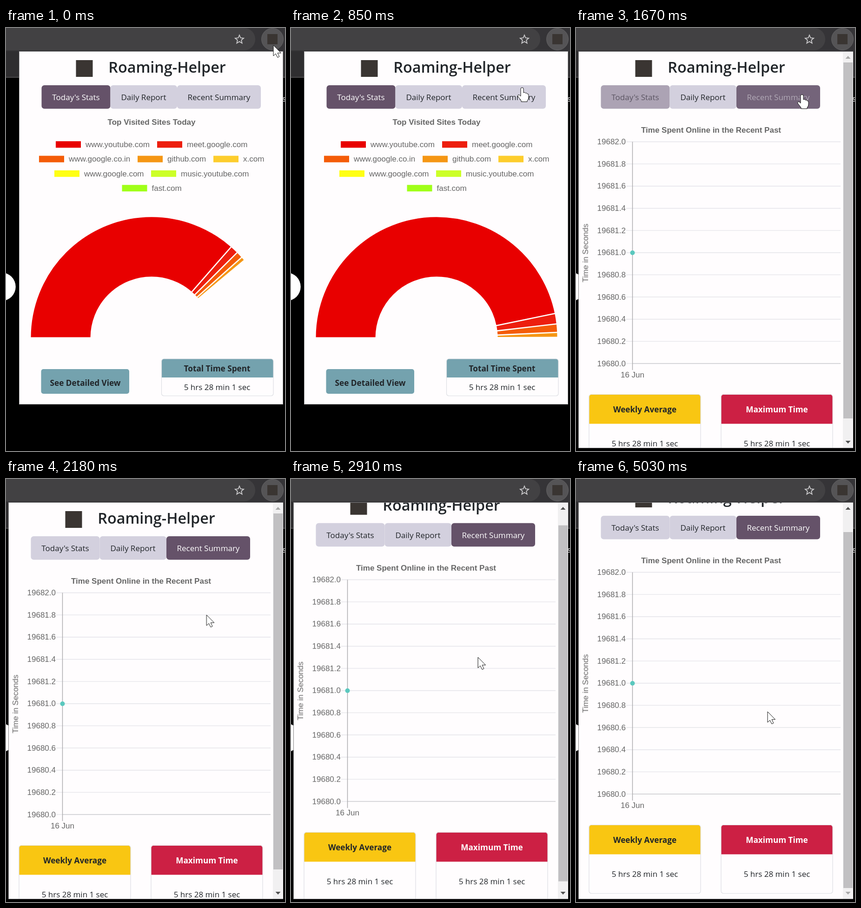
An HTML page for the animation above (5.91 s loop, 600 by 909 pixels).

```html
<!DOCTYPE html>
<html lang="en">
<head>
<meta charset="utf-8">
<title>Browsing statistics popup</title>
<style>
@property --p { syntax: "<number>"; inherits: true; initial-value: 1; }
html, body { margin: 0; width: 100%; height: 100%; overflow: hidden; background: #000; }
svg { display: block; width: 600px; height: 909px; }
text { font: 17px "Open Sans", "Noto Sans", sans-serif; fill: #212529; text-anchor: middle; }
.chart text { font-family: "Liberation Sans", Arial, sans-serif; fill: #666; }
.left text { text-anchor: start; }
.ticks text { text-anchor: end; }
.ticks path { stroke: #e4e4e9; stroke-width: 1.4; }
text.bold { font-weight: 700; font-size: 17.2px; }
.chart text.bold { font-size: 17px; }
text.title { font-size: 32.3px; font-weight: 600; }
.arc { fill: none; stroke-width: 128; stroke-dasharray: calc(var(--len) * var(--p) * 1px) 720px; }
.seg { transform: rotate(calc(var(--from) * var(--p) * 1deg)); }
.seg line { stroke: #fff; stroke-width: 2.6; }
.tab text { fill: currentColor; }
.tab { fill: #d3d0de; color: #212529; }
.box { fill: none; stroke: #dcdee3; stroke-width: 1.2; }

/* one shared 5910 ms loop */
.loop, .tab.was, .tab.now { animation: 5910ms linear infinite both; }
.donut { animation-name: sweep; }
.before { animation-name: before; }
.after { animation-name: after; }
.shift { animation-name: shift; }
.today { animation-name: fadeOut; }
.recent { animation-name: fadeIn; }
.scroll { animation-name: scroll; }
.thumb { animation-name: thumb; }
.up { animation-name: up; }
.down { animation-name: down; }
.cursor { animation-name: move; }
.arrow { animation-name: arrow; }
.hand { animation-name: hand; }
.tab.was { animation-name: deselect; }
.tab.now { animation-name: select; }

@keyframes sweep {
  0% { --p: .778; animation-timing-function: cubic-bezier(.25, 1, .5, 1); }
  11.61%, 100% { --p: 1; }
}
@keyframes before { 0%, 24.53% { opacity: 1; } 24.54%, 100% { opacity: 0; } }
@keyframes after { 0%, 24.53% { opacity: 0; } 24.54%, 100% { opacity: 1; } }
@keyframes shift {
  0%, 24.53% { transform: translateX(0); }
  24.54%, 100% { transform: translateX(-23px); }
}
@keyframes fadeOut { 0%, 21.83% { opacity: 1; } 24.1%, 100% { opacity: 0; } }
@keyframes fadeIn { 0%, 24.53% { opacity: 0; } 27.07%, 100% { opacity: 1; } }
@keyframes deselect {
  0%, 23.01% { fill: #655269; color: #fff; }
  23.52% { fill: #746477; color: #e4dfe6; }
  28.26% { fill: #aca3b4; color: #5c5663; }
  30.29%, 100% { fill: #d3d0de; color: #212529; }
}
@keyframes select {
  0%, 22.34% { fill: #d3d0de; color: #212529; }
  23.52% { fill: #a092a4; color: #3d3843; }
  28.26% { fill: #74647a; color: #b0a8b5; }
  30.29%, 100% { fill: #655269; color: #fff; }
}
@keyframes scroll {
  0%, 46.28% { transform: translateY(0); }
  50.93%, 100% { transform: translateY(-44px); }
}
@keyframes thumb {
  0%, 46.28% { transform: translateY(0); }
  50.93%, 100% { transform: translateY(40px); }
}
@keyframes up { 0%, 46.28% { fill: #a8a8a8; } 46.29%, 100% { fill: #505050; } }
@keyframes down { 0%, 50.92% { fill: #505050; } 50.93%, 100% { fill: #a8a8a8; } }
@keyframes move {
  0%, 2.54% { transform: translate(575px, 37px); animation-timing-function: ease-in-out; }
  13.87% { transform: translate(497px, 128px); }
  14.4% { transform: translate(497px, 128px); animation-timing-function: ease-out; }
  20.98%, 31.3% { transform: translate(486px, 143px); animation-timing-function: ease-in-out; }
  40.95%, 46.7% { transform: translate(400px, 377px); }
  51.78% { transform: translate(404px, 389px); animation-timing-function: ease-in-out; }
  59.56%, 100% { transform: translate(412px, 500px); }
}
@keyframes arrow { 0%, 11.84% { opacity: 1; } 11.85%, 32.49% { opacity: 0; } 32.5%, 100% { opacity: 1; } }
@keyframes hand { 0%, 11.84% { opacity: 0; } 11.85%, 32.49% { opacity: 1; } 32.5%, 100% { opacity: 0; } }
</style>
</head>
<body>
<svg viewBox="0 0 600 909">
  <clipPath id="view"><rect x="0" y="51" width="596" height="851"/></clipPath>

  <!-- browser behind the popup -->
  <rect width="600" height="909"/>
  <rect width="600" height="106" fill="#2f2e30"/>
  <rect width="600" height="50" fill="#353437"/>
  <rect x="-40" width="576" height="48" rx="24" fill="#424143"/>
  <path d="M0 106H600" stroke="#5c5b5d" stroke-width="1.5"/>
  <path transform="translate(488.4 10.7) scale(1.13)" fill="#c8c7c9"
    d="M22 9.24L14.8 8.6L12 2L9.2 8.6L2 9.24L7.46 14L5.8 21L12 17.3L18.2 21L16.55 14ZM12 15.4L8.24 17.7L9.24 13.4L5.9 10.5L10.3 10.1L12 6.1L13.7 10.1L18.1 10.5L14.8 13.4L15.8 17.7Z"/>
  <circle cx="573" cy="24" r="23.5" fill="#555456" stroke="#626163"/>
  <rect x="562" y="13" width="22" height="22" fill="#3a3532"/>
  <circle cx="-9.5" cy="556" r="30.3" fill="#fff"/>
  <text x="598" y="158" style="fill:#fff">s</text>

  <!-- popup frames -->
  <rect class="loop before" x="28.5" y="50.5" width="567" height="758" fill="#fffdfe" stroke="#a5a4a6"/>
  <rect class="loop after" x="5.5" y="50.5" width="590" height="852" fill="#fffdfe" stroke="#858486"/>

  <g clip-path="url(#view)">
    <g class="loop scroll">
      <g class="loop shift">
        <rect x="150.5" y="69" width="36" height="36" fill="#3a3532"/>
        <text class="title" x="346.5" y="96">Roaming-Helper</text>
        <g class="tab was"><rect x="76.5" y="123" width="148" height="50.5" rx="6"/><text x="150.5" y="155">Today's Stats</text></g>
        <g class="tab"><rect x="224.5" y="123" width="143.5" height="50.5" rx="6"/><text x="296" y="155">Daily Report</text></g>
        <g class="tab now"><rect x="368" y="123" width="180" height="50.5" rx="6"/><text x="458" y="155">Recent Summary</text></g>
      </g>

      <g class="loop today">
        <g class="chart">
          <text class="bold" x="313" y="208">Top Visited Sites Today</text>
          <g id="legend" class="left"></g>
          <g transform="translate(313 665.8) rotate(180)"><g id="donut" class="loop donut"></g></g>
        </g>
        <rect x="75.5" y="733" width="189.5" height="53" rx="5" fill="#74a2ae"/>
        <text class="bold" x="170.5" y="769">See Detailed View</text>
        <path d="M334.5 751V716a5 5 0 0 1 5-5H570a5 5 0 0 1 5 5V751Z" fill="#74a2ae"/>
        <rect class="box" x="334.5" y="711" width="240.5" height="79.5" rx="5"/>
        <text class="bold" x="454" y="738">Total Time Spent</text>
        <text x="454" y="778">5 hrs 28 min 1 sec</text>
      </g>

      <g class="loop recent">
        <g class="chart">
          <text class="bold" x="290.5" y="225">Time Spent Online in the Recent Past</text>
          <g id="ticks" class="ticks"></g>
          <path d="M121.5 721H569" stroke="#cfcfd2" stroke-width="1.4"/>
          <path d="M121.5 244.5V735" stroke="#a9a9ab" stroke-width="1.4"/>
          <circle cx="121.5" cy="483" r="5" fill="#5ac8be"/>
          <text x="121.5" y="751">16 Jun</text>
          <text transform="translate(26 483.5) rotate(-90)">Time in Seconds</text>
        </g>
        <g id="cards"></g>
      </g>
    </g>

    <g class="loop after">
      <rect x="574" y="51" width="22" height="851" fill="#f1f0f1"/>
      <rect class="loop thumb" x="575" y="74" width="20" height="765" fill="#c1c0c2"/>
      <path class="loop up" d="M579.5 66L585 60L590.5 66Z"/>
      <path class="loop down" d="M579.5 887L585 893L590.5 887Z"/>
    </g>
  </g>

  <g class="loop cursor" fill="#fff" stroke="#111" stroke-linejoin="round">
    <path class="loop arrow" d="M0 0V23L5 18.3L9 26.3L12.8 24.5L9 16.8H16.5Z"/>
    <path class="loop hand" d="M-3 3Q-3 0 0 0T3 3V11Q6 9 7.5 12Q10 10.5 11 13.5Q14 13 14 16V21Q14 25 11 28V30.5H-2V28L-9 19Q-10 16 -8 15.5Q-6 15 -3 18.5Z"/>
  </g>
</svg>
<script>
const fill = (id, parts) => { document.getElementById(id).innerHTML = parts.join(""); };

const sites = [
  ["www.youtube.com", 107, 0, "#e80000"],
  ["meet.google.com", 325, 0, "#ed1e0e"],
  ["www.google.co.in", 71, 1, "#f45c08"],
  ["github.com", 283, 1, "#f59614"],
  ["x.com", 446, 1, "#fdcd2d"],
  ["www.google.com", 104, 2, "#ffff14"],
  ["music.youtube.com", 312, 2, "#ccff28"],
  ["fast.com", 249.5, 3, "#a0ff19"],
];
fill("legend", sites.map(([name, x, row, color]) => {
  const y = 250.3 + row * 31.3;
  return `<rect x="${x}" y="${y - 7}" width="54" height="14" fill="${color}"/>
    <text x="${x + 64}" y="${y + 5.7}">${name}</text>`;
}));

// Segment limits in degrees; the last one only carries a divider.
const limits = [0, 168.4, 173.4, 177.4, 179.8];
fill("donut", limits.map((from, i) => {
  const len = limits[i + 1] - from;
  const arc = len > 0
    ? `<circle class="arc" r="195.5" pathLength="360" stroke="${sites[i][3]}" style="--len:${len}"/>` : "";
  return `<g class="seg" style="--from:${from}">${arc}<line x1="130" x2="261"/></g>`;
}));

fill("ticks", Array.from({ length: 11 }, (_, i) => {
  const y = 244.5 + i * 47.65;
  return `<path d="M108 ${y}H569"/><text x="107" y="${y + 5.5}">${(19682 - i * 0.2).toFixed(1)}</text>`;
}));

const cards = [
  ["Weekly Average", 28, "#f9c612", "#212529"],
  ["Maximum Time", 312, "#cc2044", "#fff"],
];
fill("cards", cards.map(([name, x, color, ink]) => `
  <path d="M${x} 850.5V792.5a5 5 0 0 1 5-5h230a5 5 0 0 1 5 5V850.5Z" fill="${color}"/>
  <rect class="box" x="${x}" y="787.5" width="240" height="147" rx="5"/>
  <text class="bold" x="${x + 120}" y="826" style="fill:${ink}">${name}</text>
  <text x="${x + 120}" y="899">5 hrs 28 min 1 sec</text>`));
</script>
</body>
</html>
```
